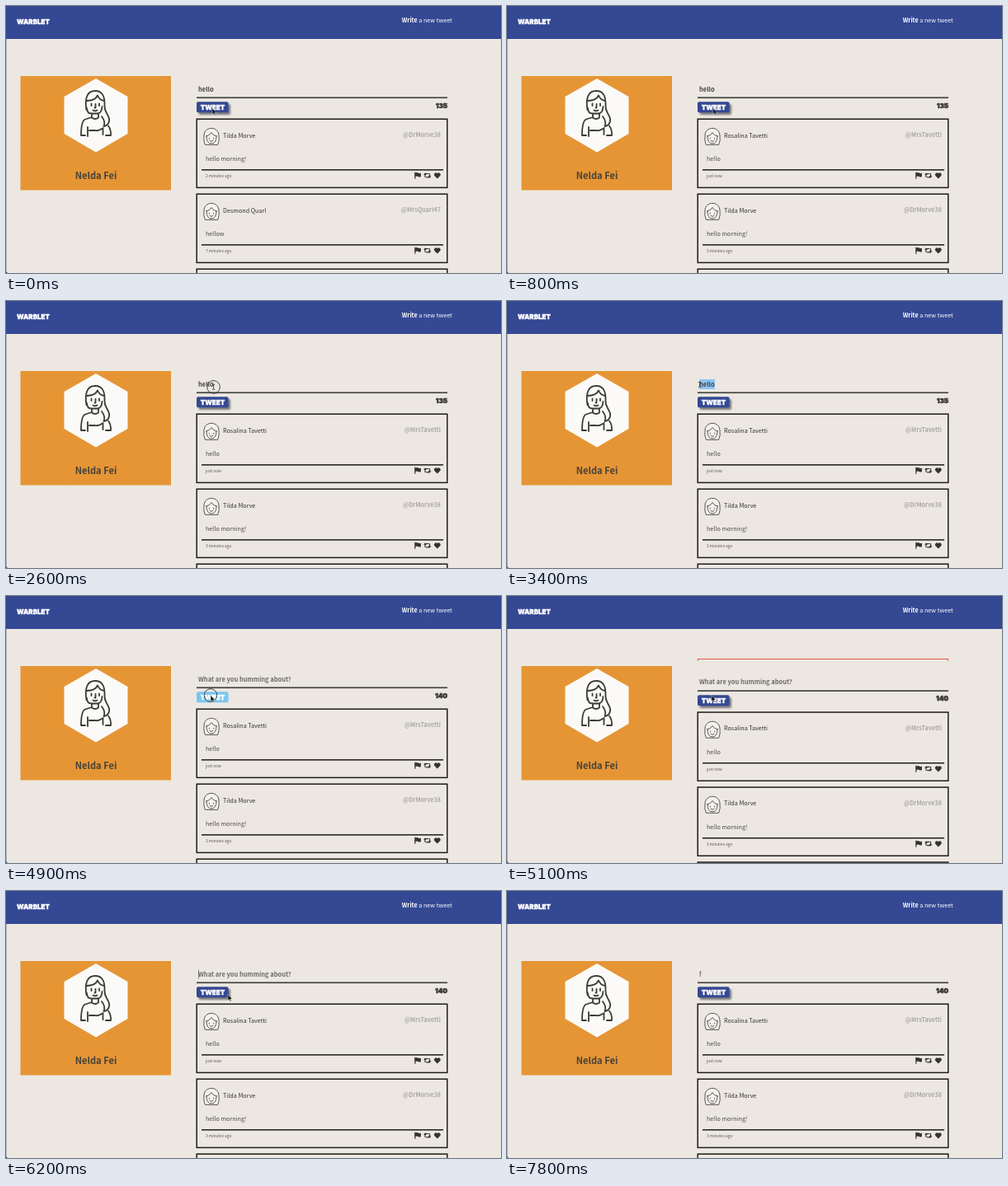
An HTML page that plays this animation: 600x324 px, repeating every 8 s.

```html
<!DOCTYPE html>
<html lang="en">
<head>
<meta charset="utf-8">
<title>Warblet</title>
<style>
html, body { margin: 0; width: 100%; height: 100%; overflow: hidden; background: #ece8e1; }
svg { display: block; width: 100vw; height: 100vh; }
text { font: 300 7.2px "Noto Sans CJK JP", "Noto Sans CJK SC", "Noto Sans", sans-serif; fill: #33332f; white-space: pre; }
.b { font-weight: 700; }
.end { text-anchor: end; }
.show { font: 900 8px Inter, sans-serif; stroke-width: .35; }
.white { fill: #fff; stroke: #fff; }
.line { fill: none; stroke-linecap: round; stroke-linejoin: round; }
</style>
</head>
<body>
<svg viewBox="0 0 600 324" preserveAspectRatio="none">
  <defs>
    <clipPath id="slide"><rect id="slideBox" x="230" y="76" width="306" height="0"/></clipPath>
    <filter id="soft" x="-20%" y="-40%" width="150%" height="200%"><feGaussianBlur stdDeviation=".8"/></filter>
    <g id="girl" class="line" stroke="#44443f" stroke-width=".9">
      <path fill="#f4f2ee" d="M241.2 168Q239 163 240 157C240.500 145.500 257.500 145.500 258 157Q259 163 256.800 168Z"/>
      <path d="M243 158Q243 167 249 167T255 158M242.500 158Q247 157.500 249 153.500Q251 157.500 255.500 158M246.300 160.200v.9M251.700 160.200v.9M247 163.500Q249 165.500 251 163.500"/>
    </g>
    <g id="icons" fill="#333330">
      <path d="M495.200 201.800h1.200v8h-1.200zM496.400 202.500q1.700-1 3.300 0t3.200 0v4.600q-1.700 1-3.300 0t-3.200 0z"/>
      <path class="line" stroke="#333330" stroke-width="1.200" d="M508 207.500v-4h4M513.500 203.500v4.300h-4"/>
      <path d="M506 204.800l2-2.300 2 2.300zM511.500 206.300l2 2.300 2-2.300z"/>
      <path d="M522.800 209.600l-3.500-3.600a2.100 2.100 0 0 1 3.500-2.700a2.100 2.100 0 0 1 3.500 2.700z"/>
    </g>
  </defs>

  <rect width="600" height="324" fill="#ece8e1"/>
  <rect y="40" width=".6" height="284" fill="#8b90a6"/>
  <path d="M0 321.500Q.5 323.500 2.500 324H0z" fill="#344894"/>
  <rect width="600" height="40" fill="#344894"/>
  <text class="show white" x="13" y="21.800">WARBLET</text>
  <text x="479.700" y="20" style="fill:#fff"><tspan class="b">Write</tspan> a new tweet</text>
  <path class="line" stroke="#7b4460" d="M508.800 24.200l1.500 1.200 1.500-1.200"/>

  <rect x="17.500" y="85" width="182.500" height="138.500" fill="#e69535"/>
  <g id="specks" fill="#f3b56a" opacity=".6"></g>
  <path d="M109 88L147.500 110V155L109 177.500L70.500 155V110Z" fill="#fbfaf8"/>
  <g class="line" stroke="#3b3b37" stroke-width="1.800">
    <path d="M97.500 126C95 111 99 103 108 103C117 103 120 110 119.500 121C119 129 123.500 130 125 136.500C126 142 122.500 145.500 118.500 146C120.500 142 119 138 116 134"/>
    <path d="M98 115Q108 115 111 108.500Q113 114 119 115M98 124Q98 130.500 104 130.500H111Q116 130 116.500 122"/>
    <path d="M103.500 118.500v2.500M113 118.500v2.500M108.500 119v4.500h-1M105.500 126.500q2.500 1.500 5 0"/>
    <path d="M104 131v4L96 137.500Q91 139.500 91 157H96M112 131v3.500M104 135.500q4 3 8 0M99 147v11M124 145.500Q127.500 150 127 157H121M101 151h7q4 1 8-2M117.500 148v8"/>
  </g>
  <text class="b" x="109" y="210" text-anchor="middle" style="font-size:11.100px;fill:#44423a">Nelda Fei</text>

  <g clip-path="url(#slide)">
    <rect x="231.400" y="76.500" width="303.200" height="17" fill="none" stroke="#e2574d"/>
    <text x="234.300" y="87.600" style="fill:#dd3b30">You must enter something.</text>
  </g>

  <g id="feed">
    <rect id="mark" y="95" height="12" fill="#8ec3f3"/>
    <text id="field" class="b" x="233" y="103.600" style="font-size:7.500px"></text>
    <rect id="caret" x="233" y="95.500" width=".6" height="11" fill="#444"/>
    <rect x="231" y="110.400" width="304" height="1.700" fill="#444440"/>
    <rect id="shade" x="233.500" y="119" width="38.500" height="13" rx="2" fill="#55555a" opacity=".75" filter="url(#soft)"/>
    <rect id="button" x="231" y="116.300" width="38.600" height="13" rx="2"/>
    <text class="show white" x="235.700" y="126">TWEET</text>
    <text id="countShade" class="show end" x="535.800" y="124.400" style="fill:#aaa79f"></text>
    <text id="count" class="show end" x="535" y="123.600" style="fill:#3a3a37;stroke:#3a3a37"></text>
    <g id="before"></g>
    <g id="after"></g>
  </g>

  <circle id="ring" fill="none" stroke="#33333a" stroke-width=".9"/>
  <path id="arrow" d="M0 0V7.500L1.700 6L2.900 8.600L4 8.100L2.900 5.600H5.200Z" fill="#111" stroke="#fff" stroke-width=".4"/>
  <path id="beam" class="line" d="M-1.300-3.200Q0-3.200 0-2.400V2.400Q0 3.200-1.300 3.200M1.300-3.200Q0-3.200 0-2.400M0 2.400Q0 3.200 1.300 3.200" stroke="#333" stroke-width=".8"/>
</svg>
<script>
const LOOP = 8000;
const el = id => document.getElementById(id);
const show = (id, on) => el(id).setAttribute('visibility', on ? 'visible' : 'hidden');
const set = (id, attrs) => {
  for (const k in attrs) el(id).setAttribute(k, attrs[k]);
};
const put = (id, text) => {
  if (el(id).textContent !== text) el(id).textContent = text;
};
const within = (t, ...spans) => spans.some(([a, b]) => t >= a && t < b);

function card([name, handle, body, age], i) {
  return `<g transform="translate(0 ${i * 91})">
    <rect x="231.200" y="137.200" width="303.600" height="83.200" fill="none" stroke="#1c1c1a" stroke-width="1.500"/>
    ${name ? `<use href="#girl"/><use href="#icons"/>
    <text x="263" y="159.600">${name}</text>
    <text class="b end" x="527" y="159.400" style="fill:#aaa8a3">${handle}</text>
    <text x="242" y="188" style="fill:#4b4b47">${body}</text>
    <rect x="237" y="205.100" width="293" height="1.500" fill="#1c1c1a"/>
    <text x="242" y="207.900" dy=".2" style="font-size:4.800px;fill:#55554f">${age}</text>` : ''}
  </g>`;
}

// The age line sits just below the divider.
const feed = cards => cards.map(card).join('')
  .replaceAll('y="205.100"', 'y="198.100"');

const tilda = age => ['Tilda Morve', '@DrMorve38', 'hello morning!', age];
el('before').innerHTML = feed([
  tilda('2 minutes ago'),
  ['Desmond Quarl', '@MrsQuarl47', 'hellow', '7 minutes ago'],
  []
]);
el('after').innerHTML = feed([
  ['Rosalina Tavetti', '@MrsTavetti', 'hello', 'just now'],
  tilda('3 minutes ago'),
  []
]);

let seed = 7;
const rand = () => (seed = seed * 16807 % 2147483647) / 2147483647;
el('specks').innerHTML = Array.from({ length: 70 }, () =>
  `<circle cx="${18 + rand() * 181}" cy="${86 + rand() * 137}" r="${.2 + rand() * .3}"/>`).join('');

// Pointer path: time, x, y
const path = [
  [0, 250, 124], [1000, 250, 124], [1600, 255, 105], [2400, 255, 105],
  [3200, 231.7, 101], [4100, 247, 106], [4600, 248, 120.500],
  [5100, 248, 120.500], [5900, 269, 125.500], [LOOP, 269, 125.500]
];
const swing = p => .5 - Math.cos(Math.PI * Math.min(1, Math.max(0, p))) / 2;

function pointer(t) {
  const i = path.findIndex(p => p[0] > t);
  const [t0, x0, y0] = path[i - 1], [t1, x1, y1] = path[i];
  const p = swing((t - t0) / (t1 - t0));
  return [x0 + (x1 - x0) * p, y0 + (y1 - y0) * p];
}

function draw(t) {
  const drop = t < 6200 ? swing((t - 5000) / 400) * 26 : 0;
  const [x, y] = pointer(t);
  const posted = t >= 500;
  const pressed = within(t, [200, 400], [4800, 5000]);
  const empty = t >= 3700 && t < 7800;

  set('slideBox', { height: drop * 18 / 26 });
  set('feed', { transform: `translate(0 ${drop})` });
  show('before', !posted);
  show('after', posted);

  put('field', t < 3700 ? 'hello' : empty ? 'What are you humming about?' : 'f');
  el('field').style.fill = empty ? '#6b6a66' : '#42423e';
  el('field').style.fontWeight = t < 7800 ? 700 : 400;
  const count = t < 3800 ? '135' : '140';
  put('count', count);
  put('countShade', count);

  const left = Math.max(232.800, x);
  set('mark', { x: left, width: Math.max(0, 252 - left) });
  show('mark', within(t, [2400, 3700]));
  show('caret', within(t, [3700, 4200], [6000, 6600], [7100, 7600]));

  set('button', { fill: pressed ? '#7cc6f0' : '#344894' });
  show('shade', !pressed);

  const visible = !within(t, [3600, 4100], [7000, LOOP]);
  const over = x > 233 && y - drop > 94 && y - drop < 111;
  const at = { transform: `translate(${x} ${y})` };
  set('arrow', at);
  set('beam', at);
  show('arrow', visible && !over);
  show('beam', visible && over);
  set('ring', { cx: x, cy: y, r: t > 6000 ? 6 : 7.800 });
  show('ring', pressed || within(t, [2500, 3200], [6000, 6200]));
}

function tick() {
  draw(performance.now() % LOOP);
  requestAnimationFrame(tick);
}
tick();
</script>
</body>
</html>
```
